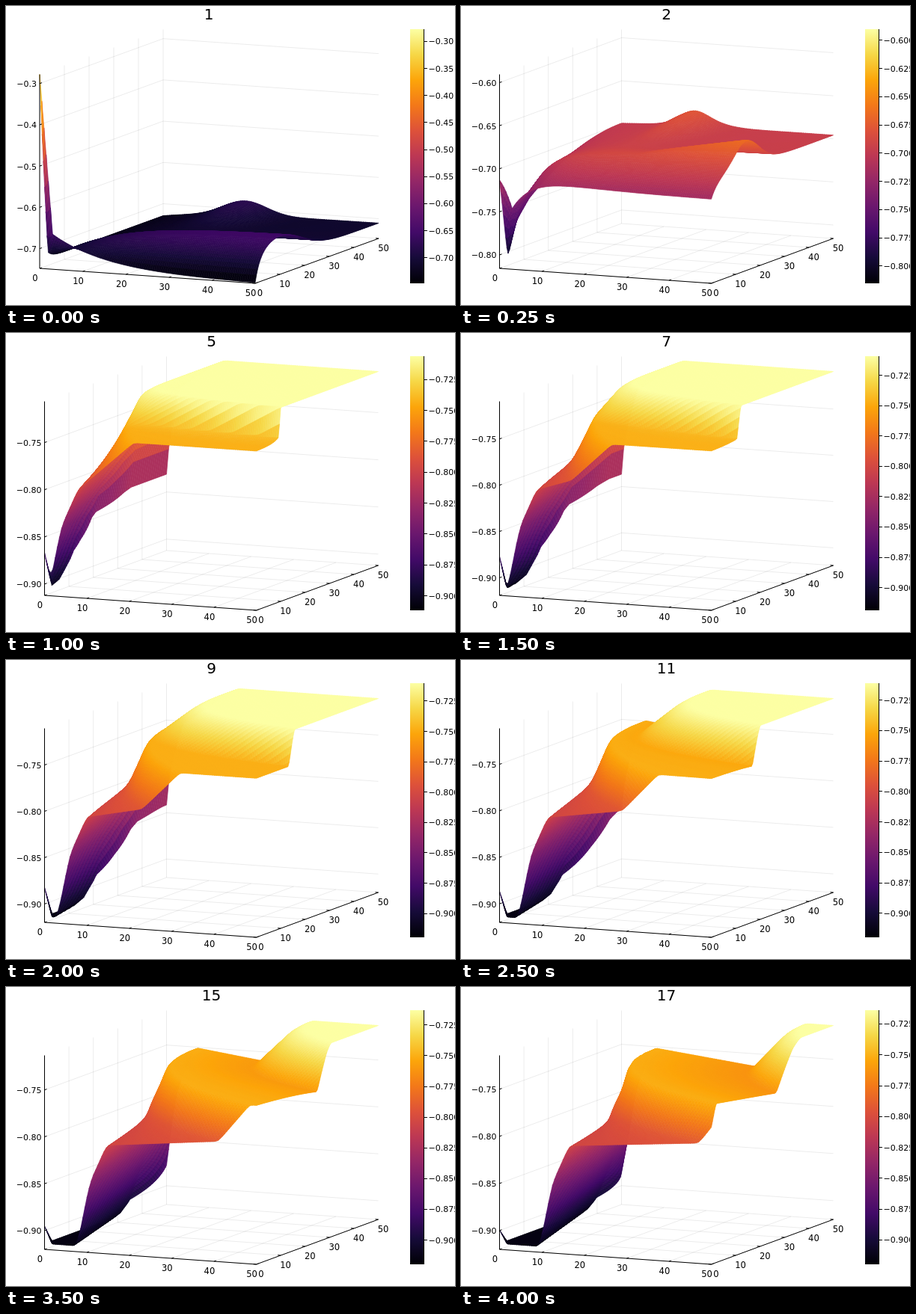
These frames come from a looping animation (600x400 px, 4.25 s). An HTML page with a canvas:

```html
<!DOCTYPE html>
<html lang="en">
<head>
<meta charset="utf-8">
<title>Surface iterations</title>
<style>
html, body { margin: 0; width: 100%; height: 100%; overflow: hidden; background: #fff; }
canvas { display: block; width: 600px; height: 400px; }
</style>
</head>
<body>
<canvas id="c" width="600" height="400"></canvas>
<script>
const ctx = document.getElementById('c').getContext('2d');
const STEP = 250, COUNT = 17, CELLS = 100;
const FONT = '"DejaVu Sans", sans-serif';

const mix = (a, b, t) => a + (b - a) * t;
const clamp = x => Math.max(0, Math.min(1, x));
const bell = (x, c, w) => Math.exp(-(((x - c) / w) ** 2));

// Piecewise linear value at x over rising xs
function interp(xs, ys, x) {
  if (x <= xs[0]) return ys[0];
  const i = xs.findIndex(k => x < k);
  if (i < 0) return ys[ys.length - 1];
  return mix(ys[i - 1], ys[i], (x - xs[i - 1]) / (xs[i] - xs[i - 1]));
}

const INFERNO = ['000004', '160b39', '420a68', '6a176e', '932667', 'bc3754',
  'dd513a', 'f37819', 'fca50a', 'f6d746', 'fcffa4']
  .map(h => [0, 2, 4].map(i => parseInt(h.slice(i, i + 2), 16)));
function color(w) {
  const p = clamp(w) * 10, i = Math.min(9, Math.floor(p));
  return `rgb(${INFERNO[i].map((a, k) => Math.round(mix(a, INFERNO[i + 1][k], p - i)))})`;
}

// Height range, settling as the iterations converge
const lowest = n => -.92 + .172 * Math.exp(-.5 * (n - 1) ** 1.31);
const highest = n => -.7065 - .00045 * n + .429 * Math.exp(-1.3 * (n - 1));

// Surfaces give a height from 0 to 1 for u, v from 0 to 1

function spikeSurface(u, v) {
  const edge = .23 * Math.exp(-u / .25);
  const rise = 1 - Math.exp(-u / .25);
  const inner = .04 + rise * (.04 + .12 * bell(v, .2, .25)) +
    .075 * bell(u, .38, .14) * bell(v, 1, .25);
  const spike = .77 * Math.max(0, 1 - u / .06 - v / .067);
  return mix(inner, edge, Math.exp(-v / .035)) + spike;
}

function ridgeSurface(u, v) {
  const front = .115 * Math.max(0, 1 - v / .24);
  const ridge = .155 * clamp((u - .5) / .48) * bell(v, .3, .13);
  const back = .085 * bell(u, .34, .09) * bell(v, 1, .35);
  const drop = .62 * (1 - v) ** 2 * Math.exp(-u / (.03 + .06 * (1 - v)));
  const well = .16 * bell(v, .07, .04) * Math.max(0, 1 - u / .06);
  return .835 - front + ridge + back - drop - well;
}

// Stairs whose fronts travel away from the corner u = v = 0
function stairs(n) {
  const t = (n - 5) / 12;
  const foot = .02 + .17 * t ** 1.3;
  const footEnd = .12 + .6 * t;
  const footBend = 2.25 - 1.56 * t;
  const top = .27 + .6 * t * t;
  const topSide = .2 + .53 * t ** 1.4;
  const topBend = 26 / (n - 3);
  const levels = [.03, .36, .56, .62, .82, .85 - .09 * t, .96, 1];
  const bump = .07 + .12 * (1 - t);

  function fronts(v) {
    const near = (1 - v) ** footBend, mid = (1 - v) ** 2.3;
    const edge = top + (1 - top) * ((1 - v) / (1 - topSide)) ** topBend;
    const xs = [
      Math.max(-.02, foot * (1 - v / footEnd)),
      mix(-.04 + .07 * t, foot + .06, near),
      mix(.05 * t, foot + .14, near),
      mix(.01 + .06 * t, .22 + .72 * t, mid),
      mix(.05 + .1 * t, .42 + .66 * t, mid),
      edge - .23, edge - .06, edge
    ];
    for (let i = 1; i < xs.length; i++) xs[i] = Math.max(xs[i], xs[i - 1] + .015);
    return xs;
  }

  return (u, v) => {
    const xs = fronts(v), at = d => interp(xs, levels, u + d);
    return (at(-.015) + 2 * at(0) + at(.015)) / 4 +
      bump * Math.max(0, 1 - u / .035 - v / .06);
  };
}

const blend = (f, g, t) => (u, v) => mix(f(u, v), g(u, v), t);

function surface(n) {
  if (n === 1) return spikeSurface;
  if (n === 2) return blend(spikeSurface, ridgeSurface, .6);
  if (n === 3) return ridgeSurface;
  if (n === 4) return blend(ridgeSurface, stairs(5), .5);
  return stairs(n);
}

function line(a, b, style) {
  ctx.strokeStyle = style;
  ctx.lineWidth = 1;
  ctx.beginPath();
  ctx.moveTo(a[0], a[1]);
  ctx.lineTo(b[0], b[1]);
  ctx.stroke();
}

function text(s, x, y, align, size = 11) {
  ctx.font = `${size}px ${FONT}`;
  ctx.textAlign = align;
  ctx.fillStyle = '#000';
  ctx.fillText(s, x, y);
}

function ticks(lo, hi, step) {
  const out = [];
  for (let i = Math.ceil(lo / step); i * step <= hi; i++) out.push(i * step);
  return out;
}
const label = (z, digits) => '\u2212' + Math.abs(z).toFixed(digits);

function drawSurface(n, project) {
  const height = surface(n), grid = [];
  for (let j = 0; j <= CELLS; j++) {
    const row = [];
    for (let i = 0; i <= CELLS; i++) {
      const u = i / CELLS, v = j / CELLS, w = clamp(height(u, v));
      row.push([...project(u, v, w), w]);
    }
    grid.push(row);
  }
  ctx.lineWidth = .7;
  ctx.lineJoin = 'round';
  // Far cells first
  for (let j = CELLS - 1; j >= 0; j--)
    for (let i = 0; i < CELLS; i++) {
      const q = [grid[j][i], grid[j][i + 1], grid[j + 1][i + 1], grid[j + 1][i]];
      ctx.fillStyle = ctx.strokeStyle = color(q.reduce((s, p) => s + p[2], 0) / 4);
      ctx.beginPath();
      q.forEach(p => ctx.lineTo(p[0], p[1]));
      ctx.closePath();
      ctx.fill();
      ctx.stroke();
    }
}

function drawBar(lo, hi, step, digits) {
  const g = ctx.createLinearGradient(0, 371, 0, 31);
  for (let i = 0; i <= 10; i++) g.addColorStop(i / 10, color(i / 10));
  ctx.fillStyle = g;
  ctx.fillRect(540, 31, 18, 340);
  line([558.5, 31], [558.5, 371], '#000');
  for (const z of ticks(lo, hi, step)) {
    const y = 371 - 340 * (z - lo) / (hi - lo);
    line([558, Math.round(y) + .5], [563, Math.round(y) + .5], '#000');
    text(label(z, digits), 564.5, y + 4.5, 'left');
  }
}

function draw(n) {
  const first = n === 1;
  const left = first ? 45 : 51.5, wide = first ? 288 : 283, deep = first ? 165 : 163;
  const lo = lowest(n), hi = highest(n);
  const project = (u, v, w) => [left + wide * u + deep * v, 351 + 20 * u - 60 * v - 259.5 * w];
  const zTicks = ticks(lo, hi, first ? .1 : .05);
  const pale = 'rgba(0,0,0,.08)';

  ctx.fillStyle = '#fff';
  ctx.fillRect(0, 0, 600, 400);

  for (let i = 0; i <= 5; i++) {
    const s = i / 5;
    line(project(0, s, 0), project(0, s, 1), pale);
    line(project(0, s, 0), project(1, s, 0), pale);
    line(project(s, 0, 0), project(s, 1, 0), pale);
  }
  for (const z of zTicks) {
    const w = (z - lo) / (hi - lo);
    line(project(0, 0, w), project(0, 1, w), pale);
    line(project(0, 1, w), project(1, 1, w), pale);
  }

  drawSurface(n, project);

  line(project(0, 0, 0), project(0, 0, 1), '#000');
  line(project(0, 0, 0), project(1, 0, 0), '#000');
  line(project(1, 0, 0), project(1, 1, 0), '#000');
  for (const z of zTicks) {
    const [x, y] = project(0, 0, (z - lo) / (hi - lo));
    line([x, y], [x + 3, y - 1], '#000');
    text(label(z, first ? 1 : 2), x - 4, y + 4.5, 'right');
  }
  for (let i = 0; i <= 5; i++) {
    const [x, y] = project(i / 5, 0, 0), [p, q] = project(1, i / 5, 0);
    line([x, y], [x + 3, y - 1], '#000');
    line([p, q], [p - 4, q - .3], '#000');
    text(i * 10, x - 6, y + 16.5, 'center', 11.5);
    text(i * 10, p + 6.5, q + 16.5, 'center', 11.5);
  }

  drawBar(lo, hi, first ? .05 : .025, first ? 2 : 3);
  text(n, first ? 271 : 274.5, 18, 'center', 20);
}

const start = performance.now();
let shown = 0;
function tick() {
  const n = Math.floor((performance.now() - start) / STEP) % COUNT + 1;
  if (n !== shown) draw(shown = n);
  requestAnimationFrame(tick);
}
tick();
</script>
</body>
</html>
```
